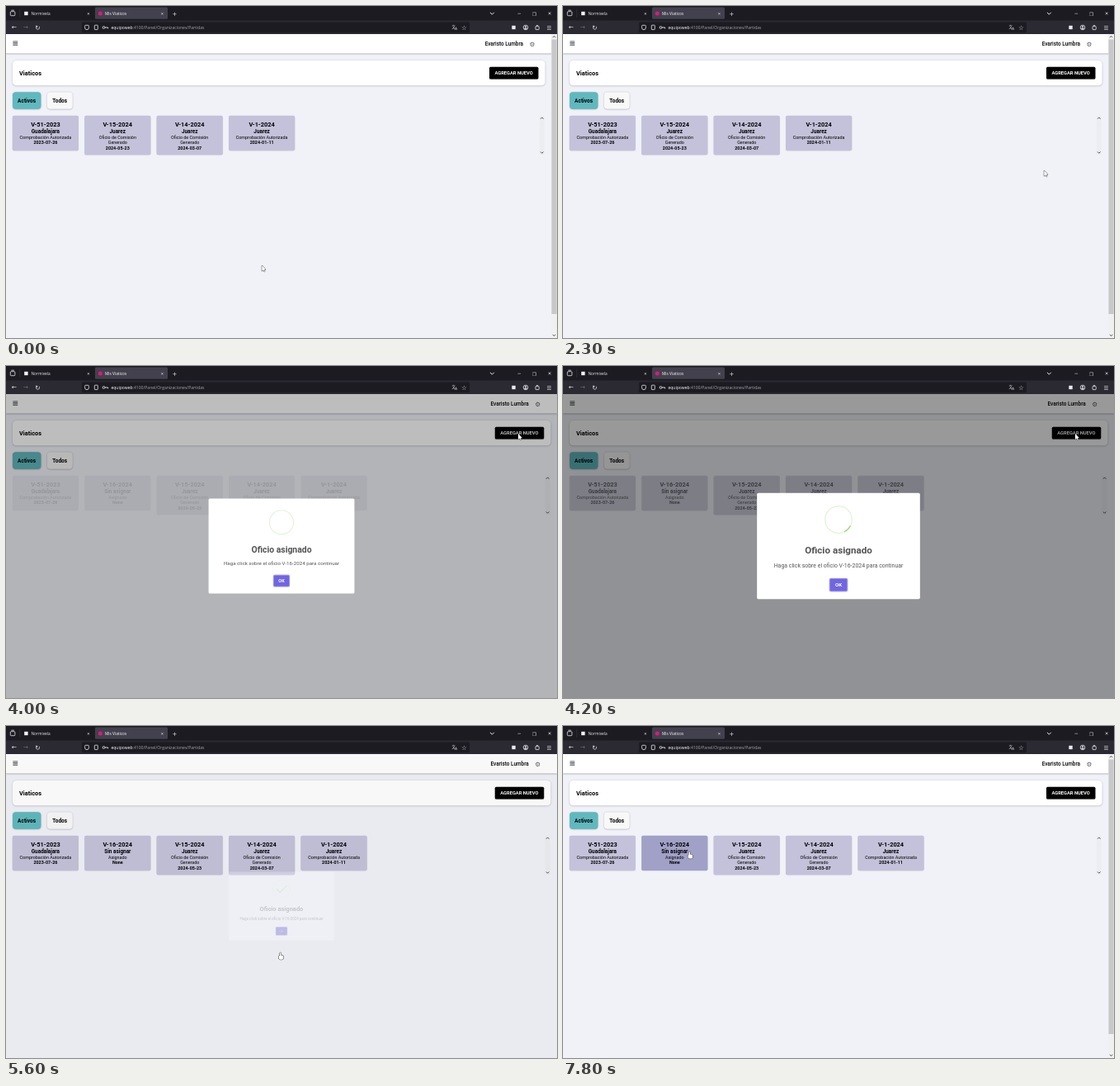
Animation, 668 px wide and 402 px high, one loop 8 s. Source, as an HTML page with a canvas:

```html
<!DOCTYPE html>
<html lang="es">
<head>
<meta charset="utf-8">
<title>Mis Viaticos</title>
<style>
html, body { margin: 0; width: 100%; height: 100%; overflow: hidden; background: #f0f2f8; }
canvas { display: block; width: 668px; height: 402px; }
</style>
</head>
<body>
<canvas id="stage"></canvas>
<script>
const W = 668, H = 402, TOP = 34, LOOP = 8000, STEP = 100;
const OPEN = 3935, CLOSE = 5500, SETTLED = 5700;
const RAD = Math.PI / 180;
const canvas = document.getElementById('stage');
const ctx = canvas.getContext('2d');
const dpr = window.devicePixelRatio || 1;
canvas.width = W * dpr;
canvas.height = H * dpr;

const UI = '"Open Sans", "Noto Sans", sans-serif';
const PAGE = 'Roboto, Arial, sans-serif';
const ICON = '"DejaVu Sans", "Noto Sans CJK JP", sans-serif';
const INK = '#e9e9ef', DARK = '#4c4d52', CHECK = '#a5dc86';

// Pointer moves; it rests between them.
const home = { x: 310.3, y: 314 };
const moves = [
  { from: 400, to: 900, x: 374, y: 292 },
  { from: 1100, to: 1500, x: 358, y: 279.5 },
  { from: 1700, to: 2300, x: 583.3, y: 199 },
  { from: 2300, to: 2600, x: 616.5, y: 104.5 },
  { from: 2600, to: 2900, x: 621, y: 82 },
  { from: 4700, to: 5400, x: 332.6, y: 274.3 },
  { from: 5600, to: 6500, x: 135, y: 163 },
  { from: 6500, to: 7400, x: 117, y: 150 },
  { from: 7400, to: 7800, x: 153.3, y: 152.2 }
];

const clamp = v => Math.max(0, Math.min(1, v));
const mix = (a, b, p) => a + (b - a) * p;
const during = (t, from, to) => clamp((t - from) / (to - from));
const inside = (p, x, y, w, h) => p.x >= x && p.x <= x + w && p.y >= y && p.y <= y + h;

function pointerAt(t) {
  let { x, y } = home;
  for (const m of moves) {
    const p = during(t, m.from, m.to);
    x = mix(x, m.x, p);
    y = mix(y, m.y, p);
  }
  return { x, y };
}

function box(x, y, w, h, r, fill, stroke) {
  ctx.beginPath();
  ctx.roundRect(x, y, w, h, r);
  if (fill) { ctx.fillStyle = fill; ctx.fill(); }
  if (stroke) { ctx.strokeStyle = stroke; ctx.lineWidth = 0.8; ctx.stroke(); }
}

function raised(x, y, w, h, r, fill, blur, alpha) {
  ctx.save();
  ctx.shadowColor = `rgba(0,0,0,${alpha})`;
  ctx.shadowBlur = blur * dpr;
  ctx.shadowOffsetY = 0.4 * dpr;
  box(x, y, w, h, r, fill);
  ctx.restore();
}

function line(color, lw, ...pts) {
  ctx.beginPath();
  for (let i = 0; i < pts.length; i += 2) ctx.lineTo(pts[i], pts[i + 1]);
  ctx.strokeStyle = color;
  ctx.lineWidth = lw;
  ctx.stroke();
}

function arc(x, y, r, from, to, color, lw = 0.8) {
  ctx.beginPath();
  ctx.arc(x, y, r, from * RAD, to * RAD);
  ctx.strokeStyle = color;
  ctx.lineWidth = lw;
  ctx.stroke();
}

function dot(x, y, r, color) {
  ctx.beginPath();
  ctx.arc(x, y, r, 0, 360 * RAD);
  ctx.fillStyle = color;
  ctx.fill();
}

// y is the middle of the capital letters.
function text(s, x, y, size, weight = 700, color = '#000', align = 'center', font = PAGE) {
  ctx.font = `${weight} ${size}px ${font}`;
  ctx.textAlign = align;
  ctx.fillStyle = color;
  ctx.fillText(s, x, y + size * 0.356);
}

// A symbol centred on its ink.
function icon(s, x, y, size, color = INK) {
  ctx.font = `${size}px ${ICON}`;
  ctx.textAlign = 'center';
  ctx.fillStyle = color;
  const m = ctx.measureText(s);
  ctx.fillText(s, x + (m.actualBoundingBoxLeft - m.actualBoundingBoxRight) / 2,
    y + (m.actualBoundingBoxAscent - m.actualBoundingBoxDescent) / 2);
}

function chevron(x, y, dir, color, s = 1.7) {
  line(color, 1, x - s, y - dir * s / 2, x, y + dir * s / 2, x + s, y - dir * s / 2);
}

function drawTabs() {
  const y = 9;
  box(0, 0, W, TOP, 0, '#1c1b22');
  box(108, 1.6, 88, 14.2, 1.5, '#42414d');
  box(5.3, 6.7, 5.6, 5, 1, null, INK);
  line(INK, 0.8, 6.3, 5.2, 9.9, 5.2);
  line('#45444d', 0.5, 16.8, 4, 16.8, 14);
  box(22.2, 6.8, 4.4, 4.4, 0, '#f4f4f6');
  text('Normivela', 30.5, y, 4.8, 400, INK, 'left', UI);
  dot(114.3, y, 2.5, '#e5147d');
  text('Mis Viaticos', 120, y, 4.8, 400, '#fff', 'left', UI);
  for (const x of [100, 189.6]) icon('✕', x, y, 4.5);
  icon('+', 204.6, y, 7);
  chevron(589.3, y, 1, INK, 2.4);
  icon('−', 622.2, y, 6);
  icon('❐', 640.6, y, 5.6);
  icon('✕', 658.7, y, 5.6);
}

function drawToolbar() {
  const y = 26;
  box(0, 17.5, W, TOP - 17.5, 0, '#2b2a33');
  box(92, 19.6, 470, 12.6, 1.5, '#1c1b22');
  icon('←', 9.7, y, 7.4);
  icon('→', 23.8, y, 7.4, '#6c6b74');
  icon('↻', 38.3, y, 7.6);
  box(95.6, 23.3, 4.8, 5.4, [1, 1, 2.4, 2.4], null, INK);
  box(107.3, 23.2, 4, 5.4, 0.7, null, INK);
  arc(118.5, y, 1.4, 0, 360, INK);
  line(INK, 0.9, 119.9, y, 123.6, y, 123.6, y + 1.4);
  text('equipoweb', 127.4, y, 5.05, 400, '#fbfbfe', 'left', UI);
  const host = ctx.measureText('equipoweb').width;
  text(':4100/Panel/Organizaciones/Partidas', 127.4 + host, y, 5.05, 400, '#a5a4ad', 'left', UI);
  icon('文', 543, y - 0.8, 4.4);
  icon('A', 546, y + 1, 4.6);
  icon('☆', 555.6, y, 7.6);

  box(613.3, 23.8, 4.4, 4.4, 0, INK);
  arc(630, y, 2.8, 0, 360, INK);
  dot(630, y - 0.8, 1, INK);
  box(628.4, y + 0.7, 3.2, 1.3, 0.5, INK);
  box(642, y - 1.4, 4.2, 4, 0.6, null, INK);
  arc(644, y - 1.7, 1, 180, 360, INK);
  icon('☰', 658.5, y, 6.6);
}

const authorised = ['Comprobación Autorizada'], issued = ['Oficio de Comisión', 'Generado'];
const added = ['V-16-2024', 'Sin asignar', ['Asignado'], 'None'];
const trips = [
  ['V-51-2023', 'Guadalajara', authorised, '2023-07-26'],
  ['V-15-2024', 'Juarez', issued, '2024-05-23'],
  ['V-14-2024', 'Juarez', issued, '2024-03-07'],
  ['V-1-2024', 'Juarez', authorised, '2024-01-11']
];

function drawCard([code, city, status, date], i, pointer, live) {
  const x = 7.8 + i * 87.4, y = 132.8, w = 80.2, h = 37 + status.length * 5.2;
  const hot = live && inside(pointer, x, y, w, h);
  raised(x, y, w, h, 1.8, hot ? '#a1a0c7' : '#c3c2da', 1, 0.16);
  let ty = y + 10.3, last = 0;
  const row = (s, size, weight) => {
    if (last) ty += (last + size) * 0.61;
    text(s, x + w / 2, ty, size, weight);
    last = size;
  };
  row(code, 7.4, 700);
  row(city, 6.4, 700);
  status.forEach(s => row(s, 5.4, 400));
  row(date, 5.4, 700);
  return hot;
}

// Draws the page and tells whether something clickable is under the pointer.
function drawPage(t, pointer) {
  const live = t < OPEN || t >= SETTLED;
  const dx = live ? 0 : 6.8;
  box(0, TOP, W, H - TOP, 0, '#f0f2f8');

  raised(0, TOP, W, 23.4, 0, '#fff', 1.6, 0.4);
  for (let i = 0; i < 4; i++) line('#3d4045', 0.8, 8.4, 42.9 + i * 1.5, 14.2, 42.9 + i * 1.5);
  text('Evaristo Lumbra', 627 + dx, 46, 6.4, 500, '#000', 'right');
  icon('⚙', 638 + dx, 46, 7.6, '#55585f');

  raised(8, 66, 645.6 + dx, 30.3, 4.5, '#fff', 2.2, 0.25);
  text('Viaticos', 16, 81, 7.4, 700, '#000', 'left');
  const onNew = live && inside(pointer, 586, 74, 59.4, 14.4);
  raised(586 + dx, 73.8, 59.4, 14.6, 1.5, '#000', onNew ? 4 : 1.5, onNew ? 0.5 : 0.3);
  text('AGREGAR NUEVO', 615.6 + dx, 81, 5.75, 700, '#fff');

  raised(8, 104.2, 34.4, 20.6, 4, '#5fb9be', 1.6, 0.3);
  text('Activos', 25.1, 114.5, 6.5);
  raised(49.8, 104.2, 31, 20.6, 4, '#f8f8f9', 1.6, 0.3);
  text('Todos', 65.2, 114.5, 6.5);

  // The list fades in again once the new trip arrives.
  const cards = t < OPEN ? trips : [trips[0], added, ...trips.slice(1)];
  ctx.globalAlpha = t < OPEN ? 1 : during(t, OPEN, OPEN + 500);
  const hot = cards.map((c, i) => drawCard(c, i, pointer, live)).some(Boolean);
  ctx.globalAlpha = 1;

  box(646.8 + dx, 133, 6, 47, 0, '#ebedf1');
  chevron(649.8 + dx, 135.8, -1, DARK);
  chevron(649.8 + dx, 177.4, 1, DARK);
  if (live) {
    box(661, TOP, 7, H - TOP, 0, '#f0f0f1');
    box(661.4, 40.5, 6.2, 332.5, 0, '#c8c8ca');
    chevron(664.5, 37.3, -1, DARK);
    chevron(664.5, 398.7, 1, DARK);
  }
  return hot || onNew;
}

function popScale(age) {
  const p = clamp(age / 300);
  if (p < 0.45) return mix(0.7, 1.05, p / 0.45);
  if (p < 0.8) return mix(1.05, 0.95, (p - 0.45) / 0.35);
  return mix(0.95, 1, (p - 0.8) / 0.2);
}

function drawCheck(age) {
  const x = 334, y = 185, r = 16.8;
  arc(x, y, r, 0, 360, 'rgba(165,220,134,.32)', 1.3);

  // A bright sweep uncovered and covered again by a turning mask
  const turn = 360 * during(age, 212, 510) ** 1.3;
  if (turn < 360) arc(x, y, r, Math.max(65 - turn, -115), Math.min(65, 245 - turn), CHECK, 1.5);

  const tip = during(age, 405, 525), long = during(age, 490, 700);
  if (!tip) return;
  ctx.lineCap = ctx.lineJoin = 'round';
  const dip = 6.2 * tip, rise = 12.7 * long;
  line(CHECK, 1.8, x - 9.2, y + 0.6, x - 9.2 + dip, y + 0.6 + dip, x - 9.2 + dip + rise, y + 0.6 + dip - rise);
  ctx.lineCap = 'butt';
  ctx.lineJoin = 'miter';
}

function drawDialog(t, pointer) {
  const age = t - OPEN, out = during(t, CLOSE, CLOSE + 134);
  if (age < 0 || out >= 1) return false;
  const dim = 0.4 * clamp(age / 100) * (1 - out) ** 2;
  box(0, TOP, W, H - TOP, 0, `rgba(0,0,0,${dim})`);

  const cx = 334, cy = 218, k = popScale(age) * mix(1, 0.5, out);
  const hot = inside(pointer, 323, 258, 22, 17);
  ctx.save();
  ctx.globalAlpha = 1 - out;
  ctx.translate(cx, cy);
  ctx.scale(k, k);
  ctx.translate(-cx, -cy);
  box(232.2, 151.8, 203.6, 132.4, 1.8, '#fff');
  drawCheck(age);
  text('Oficio asignado', cx, 223.5, 12, 700, '#545454');
  text('Haga click sobre el oficio V-16-2024 para continuar', cx, 242.3, 7.15, 400, '#545454');
  box(322.2, 257.8, 23.6, 17.4, 2.2, 'rgba(112,102,224,.5)');
  box(323.2, 258.8, 21.6, 15.4, 1.5, hot ? '#5a4dbb' : '#7066e0');
  text('OK', cx, 266.5, 6.4, 700, '#fff');
  ctx.restore();
  return hot;
}

function drawPointer({ x, y }, hand) {
  const shape = new Path2D();
  if (hand) {
    shape.roundRect(x - 0.8, y, 1.6, 6, 0.8);
    shape.roundRect(x - 1.8, y + 3.4, 5.6, 5, 1.6);
  } else {
    shape.moveTo(x, y);
    shape.lineTo(x, y + 7);
    shape.lineTo(x + 1.7, y + 5.6);
    shape.lineTo(x + 2.9, y + 7.9);
    shape.lineTo(x + 3.7, y + 7.4);
    shape.lineTo(x + 2.8, y + 5.2);
    shape.lineTo(x + 4.7, y + 5);
    shape.closePath();
  }
  ctx.strokeStyle = '#333';
  ctx.lineWidth = 1;
  ctx.stroke(shape);
  ctx.fillStyle = '#fff';
  ctx.fill(shape);
}

function draw(t) {
  const pointer = pointerAt(t);
  ctx.setTransform(dpr, 0, 0, dpr, 0, 0);
  const onPage = drawPage(t, pointer);
  const onDialog = drawDialog(t, pointer);
  drawTabs();
  drawToolbar();
  drawPointer(pointer, onPage || onDialog);
}

const start = performance.now();
function tick() {
  const t = (performance.now() - start) % LOOP;
  draw(Math.floor(t / STEP) * STEP);
  requestAnimationFrame(tick);
}
tick();
</script>
</body>
</html>
```
